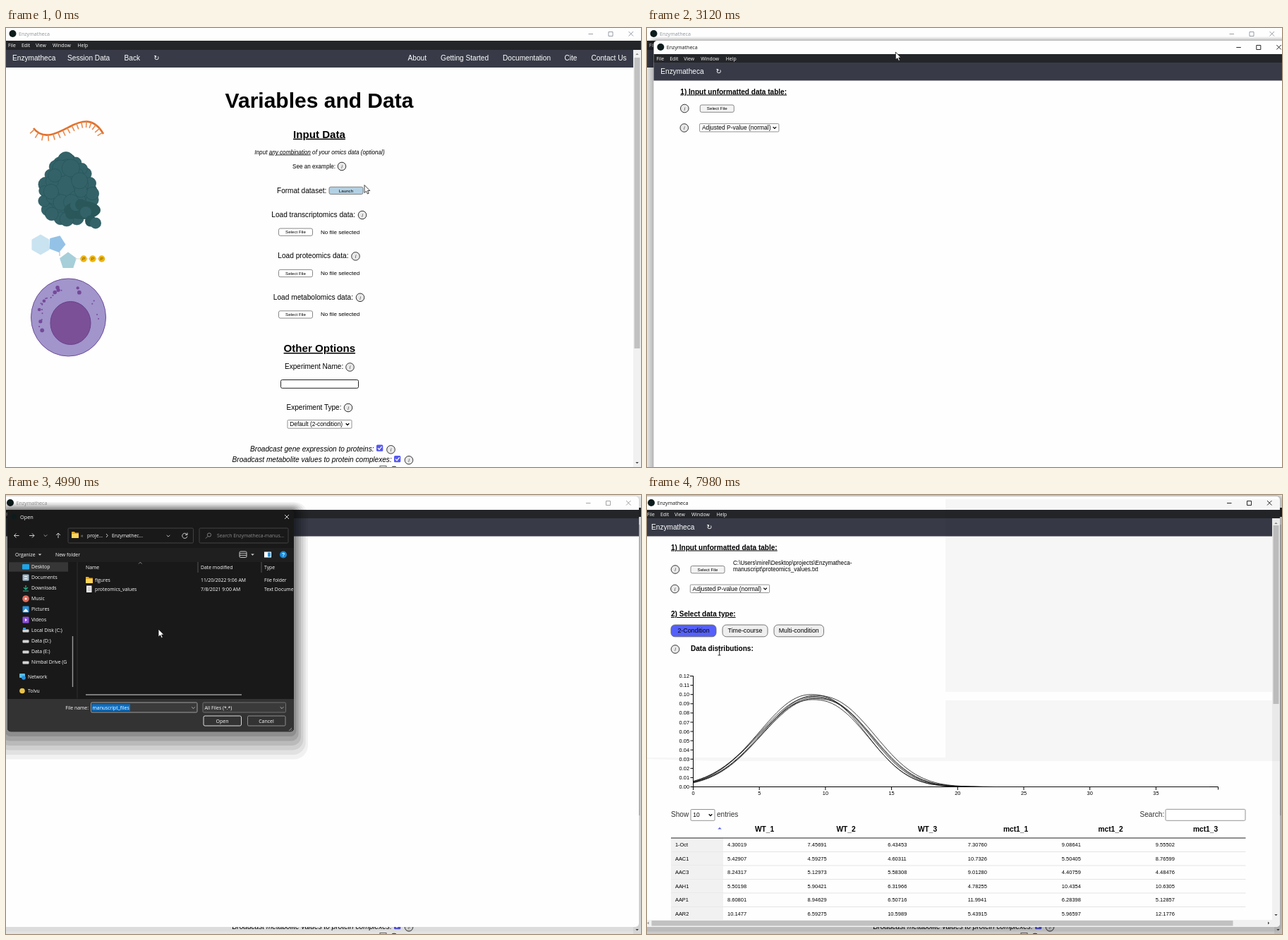
Recreate the animation shown at these times as an HTML page. Size 900 px wide and 622 px high, loop 8 s.

```html
<!DOCTYPE html>
<html lang="en">
<head>
<meta charset="utf-8">
<title>Data formatting walkthrough</title>
<style>
html, body { margin: 0; width: 100%; height: 100%; overflow: hidden; background: #fff; }
svg { display: block; width: 100vw; height: 100vh; }
text { font-family: "Liberation Sans", Arial, sans-serif; white-space: pre; }
.ui { font-family: "Open Sans", "Noto Sans", sans-serif; }
.sym { font-family: "DejaVu Sans", sans-serif; }
.b { font-weight: bold; }
.i { font-style: italic; }
.u { text-decoration: underline; }
</style>
</head>
<body>
<svg id="stage" viewBox="0 0 900 622"></svg>
<script>
const APP = 'Enzymatheca';
const LOOP = 8000;

// Markup helpers
const rect = (x, y, w, h, fill, more = '') =>
  `<rect x="${x}" y="${y}" width="${w}" height="${h}" fill="${fill}" ${more}/>`;
const circle = (x, y, r, fill, more = '') =>
  `<circle cx="${x}" cy="${y}" r="${r}" fill="${fill}" ${more}/>`;
const ellipse = (x, y, rx, ry, fill, more = '') =>
  `<ellipse cx="${x}" cy="${y}" rx="${rx}" ry="${ry}" fill="${fill}" ${more}/>`;
const line = (d, color = '#000', width = 1, more = '') =>
  `<path d="${d}" fill="none" stroke="${color}" stroke-width="${width}" ${more}/>`;
const shape = (d, fill, more = '') => `<path d="${d}" fill="${fill}" ${more}/>`;
const text = (x, y, s, size = 10, cls = '', fill = '#000', anchor = 'start') =>
  `<text x="${x}" y="${y}" font-size="${size}" class="${cls}" fill="${fill}" text-anchor="${anchor}">${s}</text>`;
const mid = (x, y, s, size, cls, fill) => text(x, y, s, size, cls, fill, 'middle');
const ui = (x, y, s, fill = '#fff', size = 6.85) => text(x, y, s, size, 'ui', fill);
const group = (id, body, more = '') => `<g id="${id}" ${more}>${body}</g>`;
const repeat = (n, draw) => Array.from({ length: n }, (_, k) => draw(k)).join('');
const chevron = (x, y, color = '#000', width = 1.3, s = 2.3) =>
  line(`M${x - s} ${y - s / 2}l${s} ${s}l${s} ${-s}`, color, width);
const triangle = (x, y, s, fill) =>
  shape(`M${x - Math.abs(s)} ${y}h${2 * Math.abs(s)}l${-Math.abs(s)} ${s}Z`, fill);
const info = (x, y) => circle(x, y, 5.8, '#e9e9e9', 'stroke="#333"') + mid(x, y + 2.7, 'i', 7.5, 'i', '#444');
const button = (x, y, label, fill = '#f3f3f3') =>
  rect(x, y, 48, 10.3, fill, 'rx="2.2" stroke="#6a6a6a" stroke-width=".8"') + mid(x + 24, y + 7.4, label, 6.2);
const select = (x, y, w, h, label, size) =>
  rect(x, y, w, h, '#fff', 'rx="1.2" stroke="#767676" stroke-width=".8"') +
  text(x + 3.3, y + h / 2 + size * .35, label, size) + chevron(x + w - 6, y + h / 2);
const checkbox = (x, y) => rect(x, y, 9.3, 9.3, '#5558f0', 'rx="1.5"') +
  line(`M${x + 2} ${y + 4.6}l2 2.2l3.6 -4.4`, '#fff', 1.3);
const polygon = (x, y, r, n, turn, fill) => shape('M' + Array.from({ length: n }, (_, k) => {
  const a = turn + k * 2 * Math.PI / n;
  return `${x + r * Math.cos(a)} ${y + r * Math.sin(a)}`;
}).join('L') + 'Z', fill);

function seeded(seed) {
  return (low, high) => {
    seed = (seed * 16807) % 2147483647;
    return low + (high - low) * seed / 2147483647;
  };
}

// Banded soft shadow, faint outside and stronger near the edge
const shadow = (x, y, w, h, alpha, side, top) => repeat(6, k => {
  const f = 1 - k / 6;
  return rect(x - side * f, y - top * f, w + 2 * side * f, h + (39 + top) * f, '#000',
    `rx="${5 + 15 * f}" opacity="${alpha * (1.5 - f)}"`);
});

const titleBar = (id, x, y) => group(id, circle(x, y, 5, '#0c1b1b') +
  text(x + 8.5, y + 2.8, APP, 7.1, 'ui', 'currentColor') +
  line(`M${x + 816} ${y + .5}h6.5M${x + 844.5} ${y - 2.5}h6v6h-6ZM${x + 873} ${y - 3}l6.5 6.5m0 -6.5l-6.5 6.5`, 'currentColor', .9));
const menuBar = (x, y) => [['File', 0], ['Edit', 19], ['View', 39], ['Window', 63], ['Help', 98.5]]
  .map(([s, dx]) => ui(x + dx, y, s)).join('');

function protein() {
  const random = seeded(11), teal = '#336369', edge = 'stroke="#28535a" stroke-width=".7"';
  const lobe = (cx, cy, spread, r) => k => {
    const a = k * 2.4;
    return circle(cx + spread * (.8 + .2 * Math.sin(a)) * Math.cos(a), cy + spread * Math.sin(a),
      r + random(-2, 2), teal, edge);
  };
  return ellipse(88, 236, 38, 32, teal) + repeat(22, lobe(88, 229, 42, 9)) + circle(85, 187, 11.5, teal, edge) +
    repeat(14, lobe(85, 222, 26, 11)) + ellipse(108, 258, 26, 13, '#2a5759') +
    repeat(6, k => circle(92 + k * 7, 263 - 14 * Math.sin(k), 8, k % 2 ? teal : '#2a5759'));
}

function cell() {
  const random = seeded(5);
  const dots = repeat(26, k => {
    const a = random(2.7, 6.5), d = random(.72, .88);
    return circle(88.5 + 50 * d * Math.cos(a), 410 + 52 * d * Math.sin(a), k % 3 ? 1 : random(1.8, 3.2), '#75499a');
  });
  return ellipse(88.5, 410, 53, 55, '#a195cb', 'stroke="#6d4c99"') + dots +
    ellipse(91.5, 418, 28.5, 30.5, '#7b5097', 'stroke="#69418a"');
}

const illustrations = () =>
  line('M39 142C53 160 73 149 90 140S124 126 138 150', '#e2702a', 2.6, 'id="strand"') + '<g id="ticks"></g>' + protein() +
  polygon(49, 307, 14.5, 6, Math.PI / 6, '#c9e3f0') + polygon(72, 306, 12.5, 5, -1.2, '#94c2e6') +
  line('M76 317v6', '#999', .7) + polygon(88, 330, 12.5, 5, -Math.PI / 2, '#a6cfd9') + line('M98 327h33', '#ddd') +
  repeat(3, k => circle(110 + 12.8 * k, 327, 4.7, '#edb50f') + mid(110 + 12.8 * k, 329.4, 'P', 6, 'i', '#6b4b00')) + cell();

function mainPage() {
  const nav = [[APP, 9], ['Session Data', 87], ['Back', 167.5], ['About', 569.5], ['Getting Started', 616],
    ['Documentation', 704], ['Cite', 791.5], ['Contact Us', 829.5]];
  const loaders = [['transcriptomics', 505], ['proteomics', 495.5], ['metabolomics', 502]].map(([kind, x], k) => {
    const y = 268 + 58.4 * k;
    return text(x - 10, y, `Load ${kind} data:`, 10.15, '', '#000', 'end') + info(x, y - 3) +
      button(386.5, y + 16, 'Select File', '#fff') + text(446, y + 23.5, 'No file selected', 8.1);
  }).join('');
  return rect(0, 0, 900, 622, '#fefefe') + titleBar('mainTitle', 9.5, 8) +
    rect(0, 18, 900, 13, '#242528') + menuBar(3, 27) + rect(0, 31, 889, 25, '#383b47') +
    nav.map(([s, x]) => text(x, 46, s, 10.15, '', '#fff')).join('') + mid(213.5, 46.3, '↻', 10, 'sym', '#fff') +
    rect(889, 31, 11, 591, '#f1f1f1') + rect(890.5, 42, 8, 412, '#c1c1c1') +
    triangle(894.5, 38, -2.2, '#888') + triangle(894.5, 615, 2.2, '#444') +
    mid(444, 113, 'Variables and Data', 30, 'b') + mid(444, 155.7, 'Input Data', 15.1, 'b u') +
    mid(444.5, 178.5, 'Input <tspan class="u">any combination</tspan> of your omics data (optional)', 8.15, 'i') +
    text(406, 199, 'See an example:', 8.15) + info(476, 196) +
    text(384, 234, 'Format dataset:', 10.05) + button(458, 225.2, 'Launch', '#b3d0e3') + loaders +
    mid(444.3, 459, 'Other Options', 15.1, 'b u') +
    text(395, 483.3, 'Experiment Name:', 10.05) + info(487.5, 480.5) +
    rect(389.5, 498.5, 110, 11.8, '#fff', 'rx="2" stroke="#222"') +
    text(397.5, 540.7, 'Experiment Type:', 10.05) + info(485, 538) +
    select(399, 555.5, 91, 11.7, 'Default (2-condition)', 8.3) +
    text(346, 600, 'Broadcast gene expression to proteins:', 10.15, 'i') + checkbox(525, 590.5) + info(545.5, 597.3) +
    text(320.5, 615, 'Broadcast metabolite values to protein complexes:', 10.15, 'i') + checkbox(550, 606) + info(571, 612.3) +
    rect(530, 620.5, 9, 9, '#fff', 'stroke="#666"') + info(550, 627) + illustrations();
}

function plot() {
  const px = v => 65.5 + v * 18.74, py = v => 413.5 - v * 1308;
  const random = seeded(8);
  const curve = k => {
    const top = .1 - .0011 * k, mean = random(8.9, 9.4), left = random(3.8, 4.3), right = random(4, 4.35);
    const points = [];
    for (let v = 0; v <= 39; v += .3) {
      const z = Math.abs(v - mean) / (v < mean ? left : right);
      points.push(`${px(v).toFixed(1)} ${py(top * Math.exp(-.5 * z ** (v < mean ? 2.1 : 2.4))).toFixed(1)}`);
    }
    return line('M' + points.join('L'), '#111', .8);
  };
  return line('M61 256.5h4.5V413.5M65.5 418V413.5H809.5v4') +
    repeat(13, k => line(`M61.5 ${py(k / 100)}h4`) +
      text(60, py(k / 100) + 2.6, (k / 100).toFixed(2), 7.4, '', '#000', 'end')) +
    repeat(8, k => line(`M${px(5 * k)} 413.5v4.5`) + mid(px(5 * k), 425, 5 * k, 7.4)) + repeat(6, curve);
}

function table() {
  const random = seeded(3);
  const heads = ['WT_1', 'WT_2', 'WT_3', 'mct1_1', 'mct1_2', 'mct1_3'];
  const rows = ['1-Oct', 'AAC1', 'AAC3', 'AAH1', 'AAP1', 'AAR2'];
  const column = c => 114 + 113.6 * c + 19.4 * Math.max(0, c - 3);
  const body = rows.map((name, r) => {
    const y = 486 + 19.5 * r;
    return rect(34, y, 74, 19.5, '#f1f1f1') + line(`M34 ${y + 19.5}H848.5`, '#ddd', .8) + text(40, y + 12.3, name, 7.4) +
      repeat(6, c => text(column(c), y + 12.3, random(4.3, 12.3).toPrecision(6), 7.5));
  }).join('');
  return text(34, 456.2, 'Show', 10.1, '', '#333') + select(62, 445.5, 34, 15.8, '10', 8.5) +
    text(99, 456.2, 'entries', 10.1, '', '#333') + text(698.5, 456.2, 'Search:', 10.1, '', '#333') +
    rect(735, 445.3, 113, 16, '#fff', 'rx="1.5" stroke="#888" stroke-width=".9"') + triangle(103, 473.5, -2.7, '#5b62f0') +
    heads.map((s, c) => mid(166.5 + 115.5 * c + 19 * Math.max(0, c - 2.5), 477, s, 10.2, 'b')).join('') +
    body + line('M34 486H848.5', '#222', 1.1);
}

function results() {
  const pill = (x, w, label, id) => rect(x, 184, w, 16.8, '#efefef', `id="${id}" rx="5.5" stroke="#666" stroke-width=".9"`) +
    mid(x + w / 2, 195.4, label, 8.85);
  return text(34, 172, '2) Select data type:', 10.05, 'b u') + pill(34, 64, '2-Condition', 'choice') +
    pill(107, 64, 'Time-course', 'course') + pill(180, 70.5, 'Multi-condition', 'multi') +
    info(40, 218.5) + text(62, 221, 'Data distributions:', 10.05, 'b') + plot() + table() +
    rect(886, 33, 11, 579, '#f1f1f1') + rect(887.5, 43, 8, 420, '#c1c1c1', 'id="thumb"') +
    triangle(891.5, 41, -2.2, '#888') + triangle(891.5, 594, 2.2, '#444') +
    rect(0, 602, 886, 10, '#f1f1f1') + rect(6.5, 603, 824, 7.5, '#c1c1c1') +
    shape('M2.5 604.5v4l-2.2 -2Z', '#888') + shape('M880 604.5v4l2.2 -2Z', '#444');
}

function toolWindow() {
  const W = 901, H = 610, shifted = 'transform="translate(4 -2)"';
  return group('toolShadow', shadow(0, 0, W, H, .055, 15, 6)) +
    group('toolBody', rect(0, 0, W, H, '#fefefe') + titleBar('toolTitle', 10, 9) +
      rect(0, 19, W, 12, '#242528') + menuBar(4, 28) +
      group('toolPage', rect(0, 31, W, 25.5, '#383b47') + text(10, 46.5, APP, 10.15, '', '#fff') +
        mid(92.5, 47, '↻', 10, 'sym', '#fff') + text(38, 75.5, '1) Input unformatted data table:', 10.05, 'b u') +
        group('inputs', info(44, 96) + button(66, 91, 'Select File') + info(43.5, 123.5) +
          select(65.3, 117.6, 112.3, 11.4, 'Adjusted P-value (normal)', 8.45)) +
        group('path', text(126, 96.7, `C:\\Users\\mirel\\Desktop\\projects\\${APP}-`, 8.15) +
          text(126, 106, 'manuscript\\proteomics_values.txt', 8.15)) +
        group('results', results(), shifted)) +
      group('tint', shape('M423 6H897V377H100L0 374V372H423Z', '#000', 'opacity=".03"'), shifted) +
      group('stripe', rect(423, 279, 463, 12, '#fefefe'), shifted), 'clip-path="url(#toolClip)"');
}

function dialog() {
  const folder = (x, y) => shape(`M${x} ${y}h4l1 1.5h5v7.5h-10Z`, '#e5a823') + rect(x, y + 3, 10, 6, '#ffd35c', 'rx=".8"');
  const box = (x, y, w, h, stroke, fill = 'none') => rect(x, y, w, h, fill, `rx="1.5" stroke="${stroke}" stroke-width=".9"`);
  const drive = y => rect(23.5, y - 1.5, 9, 4, '#d5d5d5', 'rx="1"');
  const tile = (y, color) => rect(23.5, y - 4.5, 9, 9, color, 'rx="1"');
  const places = [
    ['Desktop', y => rect(23, y - 4, 10, 7.5, '#1fa4e6', 'rx="1"')],
    ['Documents', y => tile(y, '#9db9cc') + line(`M26 ${y - 1.5}h4m-4 3h4`, '#fff', .9)],
    ['Downloads', y => line(`M28 ${y - 4}v6m-3 -3l3 3l3 -3M24 ${y + 4}h8`, '#27b08b', 1.2)],
    ['Music', y => circle(28, y, 4.8, '#df6a5a') + circle(28, y, 1.5, '#fff')],
    ['Pictures', y => tile(y, '#2a93df') + shape(`M24 ${y + 3.5}l4 -4.5l4 4.5Z`, '#fff')],
    ['Videos', y => tile(y, '#8c4fe0') + shape(`M27 ${y - 2}v4l3 -2Z`, '#fff')],
    ['Local Disk (C:)', y => drive(y) + rect(24, y - 4, 4, 2, '#2ba3e6')],
    ['Data (D:)', drive], ['Data (E:)', drive], ['Nimbal Drive (G', drive]];
  const files = [['figures', '11/20/2022 9:06 AM', 'File folder'], ['proteomics_values', '7/8/2021 9:00 AM', 'Text Docume']];

  const header = circle(11.5, 30.5, 3.5, '#0c1b1b') + ui(20, 33.5, 'Open', '#fff', 7.3) +
    line('M395 28l6 6m0 -6l-6 6', '#eee', .9) +
    line('M18.5 57.5h-7m3 -3l-3 3l3 3M33 57.5h7m-3 -3l3 3l-3 3M74 61v-7m-3 3l3 -3l3 3', '#ccc') + chevron(56, 57.5, '#aaa', .9) +
    box(88, 47, 177.5, 21, '#484848') + folder(93, 52) + ui(106, 60, '«', '#aaa') + ui(115, 60, 'proje...') +
    line('M142 55l2.2 2.5l-2.2 2.5', '#ddd', .9) + ui(150, 60, 'Enzymathec...') + chevron(230, 58, '#ccc', .9) +
    line('M256.5 56a3.6 3.6 0 1 0 .4 2.6M257 53.5v3h-3', '#ddd', .9) + box(274, 47, 126, 21, '#484848') +
    circle(288, 56.5, 2.6, 'none', 'stroke="#999" stroke-width=".8"') + line('M286 58.5l-3 3', '#999', .8) +
    ui(299, 60, `Search ${APP}-manus...`, '#8c8c8c') + ui(13, 87, 'Organize') + triangle(48, 83.5, 2.3, '#ddd') +
    ui(70, 87, 'New folder') + box(331, 80, 10, 8.5, '#ddd') + line('M331 82.8h10m-10 2.8h10', '#ddd', .8) +
    triangle(349.5, 83.5, 2.3, '#ddd') + rect(366, 80.5, 10, 8, '#fff') + rect(371, 81.5, 4, 6, '#2a93df') +
    circle(393, 84.5, 5, '#1689d8') + mid(393, 87.2, '?', 7.5, 'b', '#fff');

  const sidebar = rect(4, 95.2, 84, 13.4, '#363636') +
    places.map(([name, icon], k) => icon(102 + 15 * k) + ui(36, 104.4 + 15 * k, name)).join('') +
    rect(19, 253, 8, 6, '#58bde8', 'rx="1"') + circle(25, 259, 2.8, '#2a93df') + ui(31, 259.5, 'Network') +
    circle(23, 277.5, 3.8, '#e8c24a') + ui(31, 279.5, 'Tolvu') + line('M101 95V288', '#303030') +
    line('M94.5 200V272M113 283H334', '#9a9a9a', 1.4);

  const list = line('M272 95v15M362 95v15', '#666', .8) + line('M188 97.5l2.3 -2.3l2.3 2.3', '#aaa', .8) +
    ui(113, 105, 'Name') + ui(276, 105, 'Date modified') + ui(366, 105, 'Type') +
    rect(111, 127.5, 297, 13, '#4d4d4d', 'id="row"') + folder(113, 116) +
    rect(114, 128.5, 7.5, 9.5, '#eee') + line('M115.5 131.5h4.5m-4.5 2h4.5m-4.5 2h4.5', '#999', .6) +
    files.map((row, r) => row.map((s, c) => ui([126, 276, 366][c], 123 + 13.3 * r, s)).join('')).join('');

  const footer = text(117, 303.6, 'File name:', 6.85, 'ui', '#fff', 'end') + box(120.5, 294, 150.5, 14, '#aaa', '#3a3a3a') +
    rect(122, 296.3, 54, 9.6, '#0a6fc4', 'id="selection"') +
    '<text id="fileName" x="122.5" y="303.6" font-size="6.85" class="ui" fill="#fff"></text>' +
    chevron(265.5, 301.5, '#bbb', .9) + box(279, 294, 117.5, 14, '#777', '#3a3a3a') + ui(281.5, 303.6, 'All Files (*.*)') +
    chevron(391, 301.5, '#bbb', .9) + rect(280, 313, 53.5, 14, '#333', 'id="open" rx="2" stroke="#ddd"') +
    box(342.5, 313, 53.5, 14, '#999') + mid(306.5, 322.5, 'Open', 7, 'ui', '#fff') + mid(369, 322.5, 'Cancel', 7, 'ui', '#fff') +
    line('M401 334l4 -4m-1.5 4l1.5 -1.5', '#aaa', .8);

  return shadow(2, 21, 406, 314.5, .1, 20, 11) + '<g clip-path="url(#dialogClip)">' + rect(2, 21, 406, 314.5, '#191919') +
    rect(2, 75, 406, 20, '#1f1f1f') + rect(2, 289, 406, 46.5, '#333') + header + sidebar + list + footer + '</g>';
}

const pointers =
  group('arrow', shape('M0 0V11L2.6 8.7L4.4 12.5L6.2 11.7L4.5 8H7.8Z', '#fff', 'stroke="#111" stroke-width=".8"')) +
  group('hand', shape('M2.6 8V1.2Q3.6 -.4 4.6 1.2V5Q6 4.2 6.6 5.4Q8 4.7 8.6 6Q10.4 5.4 10.6 7.2V11Q10 12.4 9.6 14H4.4Q3.4 12 .4 9Q.2 7 2.6 8Z', '#fff', 'stroke="#111" stroke-width=".8"')) +
  group('beam', line('M-2 0H2M-2 10H2M0 0V10', '#222', .9));

const stage = document.getElementById('stage');
stage.innerHTML = `<defs>
  <clipPath id="toolClip"><rect width="901" height="610" rx="5"/></clipPath>
  <clipPath id="dialogClip"><rect x="2" y="21" width="406" height="314.5" rx="5"/></clipPath></defs>` +
  mainPage() + group('tool', toolWindow()) + group('dialog', dialog()) + group('pointer', pointers);

const $ = id => document.getElementById(id);
const show = (id, on) => $(id).setAttribute('display', on ? 'inline' : 'none');
const move = (id, x, y) => $(id).setAttribute('transform', `translate(${x} ${y})`);

// Short strokes hanging from the strand
const strand = $('strand');
$('ticks').innerHTML = repeat(16, k => {
  const along = (k + .3) / 15.6 * strand.getTotalLength();
  const p = strand.getPointAtLength(along), q = strand.getPointAtLength(along + .5);
  return line(`M${p.x} ${p.y}l${(p.y - q.y) * 17} ${(q.x - p.x) * 17}`, '#e98a50', 1.6);
});

// Each move: first step, last step, place reached, pointer kind
const windowMoves = [[0, 0, 15, 235], [2720, 3120, 9.3, 18], [3270, 3420, -5, -9], [3570, 3690, -4, 2]];
const pointerMoves = [[0, 0, 508, 222.5], [1120, 1360, 490, 226.5, 'hand'], [2210, 2450, 320, 284],
  [2570, 2570, 358, 251], [3970, 3970, 322, 22], [4120, 4480, 95, 100, 'hand'], [4870, 4870, 216, 190],
  [4990, 4990, 216, 190], [5110, 5260, 172, 136], [5650, 6110, 302, 322], [6590, 6860, 155, 154.5],
  [7170, 7470, 80, 192, 'hand'], [7860, 7980, 102.5, 217, 'beam']];

// Eased travel, sampled in steps of about 120 ms
function follow(moves, t) {
  let x = moves[0][2], y = moves[0][3], kind;
  for (const [first, last, toX, toY, toKind = 'arrow'] of moves) {
    if (t < first) break;
    const steps = Math.round((last - first) / 125) + 1;
    const gap = (last - first) / (steps - 1) || 1;
    const done = Math.min(1, (Math.floor((t - first) / gap) + 1) / steps);
    x += (toX - x) * done ** .7;
    y += (toY - y) * done ** .7;
    kind = done < 1 ? 'arrow' : toKind;
  }
  return { x, y, kind };
}

function render(t) {
  const within = (from, to = LOOP) => t >= from && t < to;
  const win = follow(windowMoves, t);
  move('tool', win.x, win.y);
  show('tool', within(1630));
  show('toolShadow', within(1780));
  show('toolPage', within(1780));
  const blurred = within(4720, 6350);
  $('toolShadow').setAttribute('opacity', blurred ? .5 : 1);
  $('toolTitle').style.color = blurred ? '#999' : '#111';
  $('mainTitle').style.color = within(1510, 1630) ? '#111' : '#8d949c';

  const loaded = within(6470);
  move('inputs', 0, loaded ? 7.5 : 0);
  show('path', loaded);
  show('tint', loaded);
  show('results', within(6590));
  show('stripe', within(7860));
  $('choice').setAttribute('fill', within(7590) ? '#5560fb' : within(7470) ? '#dedede' : '#efefef');
  $('thumb').setAttribute('height', within(7860) ? 253 : 420);

  show('dialog', within(4870, 6350));
  $('dialog').setAttribute('opacity', within(4870, 4990) ? .8 : 1);
  const picked = within(5380);
  show('row', within(5260));
  $('row').setAttribute('fill', picked ? '#666' : '#4d4d4d');
  show('selection', !picked);
  $('fileName').textContent = picked ? 'proteomics_values' : 'manuscript_files';
  $('open').setAttribute('fill', within(6110) ? '#4a4a4a' : '#333');

  // While dragging, the pointer holds the title bar
  const dragging = within(2720, 3970);
  const pointer = dragging ? { x: win.x + 343, y: win.y + 16, kind: 'arrow' } : follow(pointerMoves, t);
  move('pointer', pointer.x, pointer.y);
  for (const id of ['arrow', 'hand', 'beam']) show(id, id === pointer.kind);
}

const start = performance.now();
function tick() {
  render((performance.now() - start) % LOOP);
  requestAnimationFrame(tick);
}
tick();
</script>
</body>
</html>
```
